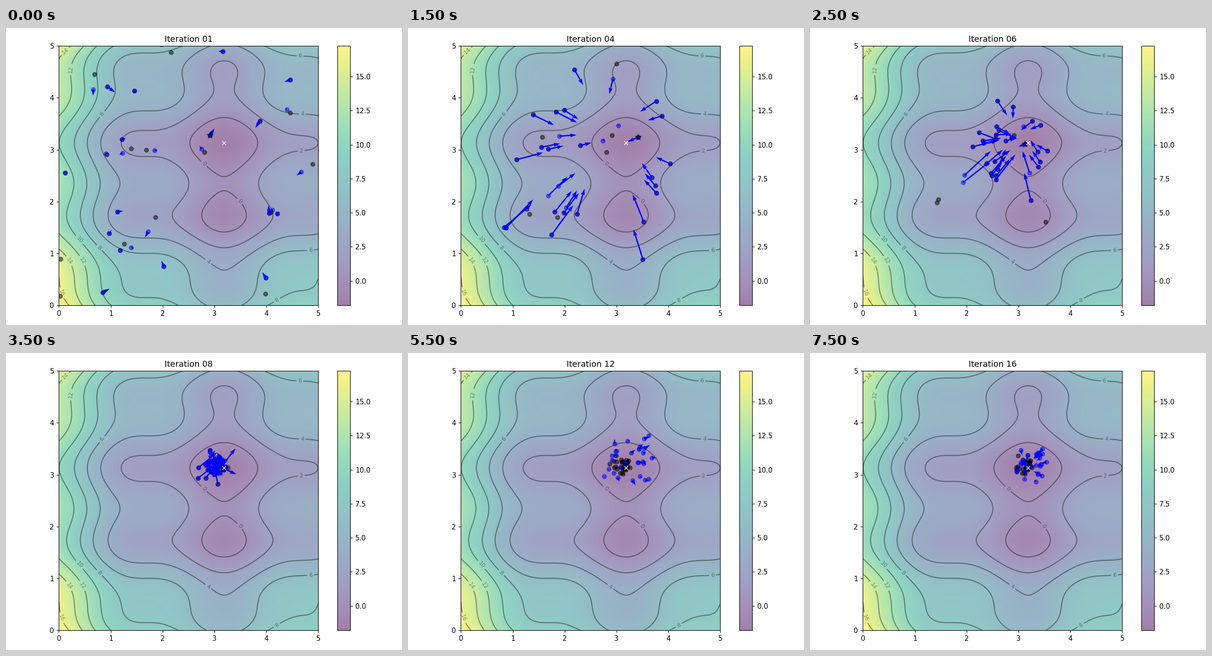
Write a matplotlib script that moves like this. It is 864x648 px and loops after 8000 ms.

```python
import numpy as np
import matplotlib.pyplot as plt
from matplotlib.animation import FuncAnimation

WIDTH, HEIGHT, DPI = 864, 648, 108
FRAMES, INTERVAL = 16, 500
N = 30                      # particles
W, C1, C2 = 0.8, 0.1, 0.1   # inertia, cognitive and social weights


def f(x, y):
    return (x - 3.14)**2 + (y - 2.72)**2 + np.sin(3*x + 1.41) + np.sin(4*y - 1.73)


def run_swarm(steps):
    """Particle swarm optimisation; returns (X, V, pbest, gbest) per step."""
    rng = np.random.RandomState(100)
    X = rng.rand(2, N) * 5
    V = rng.randn(2, N) * 0.1
    pbest, pbest_obj = X.copy(), f(*X)
    gbest = pbest[:, [pbest_obj.argmin()]]
    states = []
    for _ in range(steps):
        r1, r2 = rng.rand(2)
        V = W*V + C1*r1*(pbest - X) + C2*r2*(gbest - X)
        X = X + V
        obj = f(*X)
        better = obj <= pbest_obj
        pbest = np.where(better, X, pbest)
        pbest_obj = np.minimum(pbest_obj, obj)
        gbest = pbest[:, [pbest_obj.argmin()]]
        states.append((X, V, pbest, gbest))
    return states


# The swarm has already moved once before the first picture
states = run_swarm(FRAMES + 1)[1:]

axis = np.linspace(0, 5, 100)
x, y = np.meshgrid(axis, axis)
z = f(x, y)
low = z.argmin()

fig, ax = plt.subplots(figsize=(WIDTH / DPI, HEIGHT / DPI), dpi=DPI)
# Margins in pixels
side, top, bottom = 16.2, 39.2, 42.7
fig.subplots_adjust(left=side / WIDTH, right=1 - side / WIDTH,
                    bottom=bottom / HEIGHT, top=1 - top / HEIGHT)

img = ax.imshow(z, extent=[0, 5, 0, 5], origin='lower', cmap='viridis', alpha=0.5)
fig.colorbar(img, ax=ax)
ax.plot(x.flat[low], y.flat[low], marker='x', markersize=5, color='white')
contours = ax.contour(x, y, z, 10, colors='black', alpha=0.4)
ax.clabel(contours, inline=True, fontsize=8, fmt='%.0f')

X, V, pbest, gbest = states[0]
pbest_plot = ax.scatter(*pbest, marker='o', color='black', alpha=0.5)
p_plot = ax.scatter(*X, marker='o', color='blue', alpha=0.5)
p_arrow = ax.quiver(*X, *V, color='blue', width=0.005,
                    angles='xy', scale_units='xy', scale=1)
gbest_plot = ax.scatter(*gbest, marker='*', s=100, color='black', alpha=0.4)
ax.set(xlim=(0, 5), ylim=(0, 5))
title = ax.set_title('Iteration 01')


def animate(i):
    X, V, pbest, gbest = states[i]
    title.set_text(f'Iteration {i + 1:02d}')
    pbest_plot.set_offsets(pbest.T)
    p_plot.set_offsets(X.T)
    p_arrow.set_offsets(X.T)
    p_arrow.set_UVC(*V)
    gbest_plot.set_offsets(gbest.T)
    return title, pbest_plot, p_plot, p_arrow, gbest_plot


anim = FuncAnimation(fig, animate, frames=FRAMES, interval=INTERVAL,
                     repeat=True, repeat_delay=0, blit=False)
plt.show()
```
